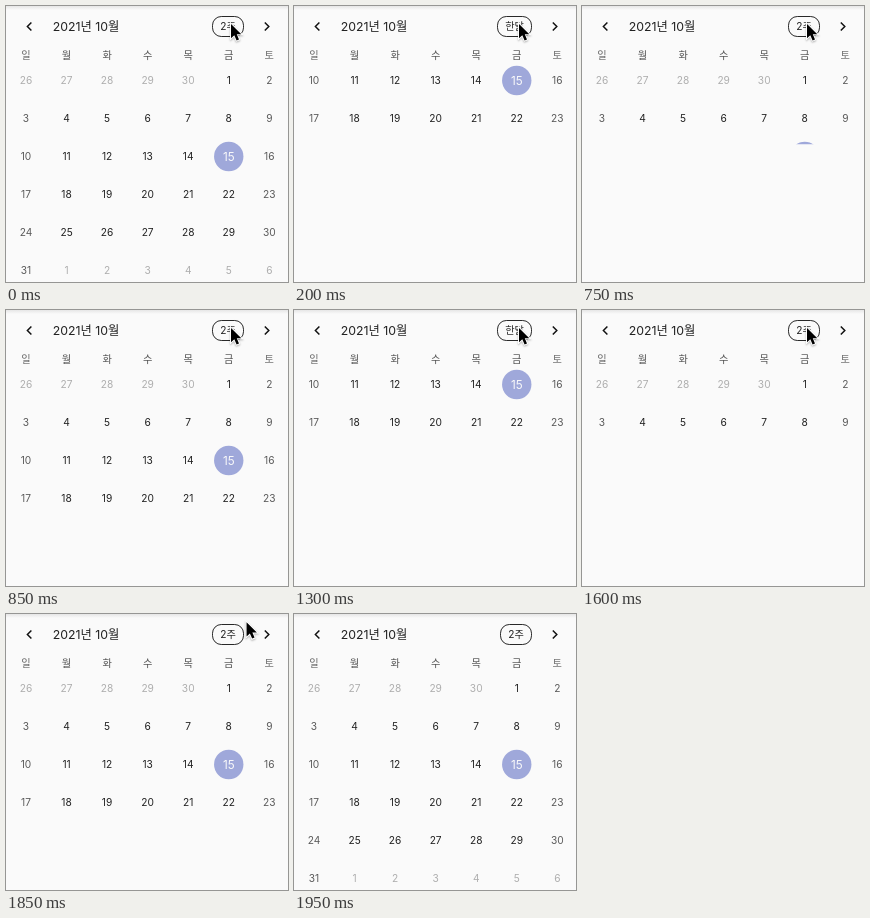
These frames come from a looping animation (282x276 px, 2570 ms). An HTML page with a canvas:

```html
<!DOCTYPE html>
<html lang="ko">
<head>
<meta charset="utf-8">
<title>Calendar</title>
<style>
  html, body { margin: 0; width: 100%; height: 100%; overflow: hidden; background: #fafafa; }
  canvas { display: block; width: 282px; height: 276px; }
</style>
</head>
<body>
<canvas id="stage"></canvas>
<script>
const W = 282, H = 276, LOOP = 2570, STEP = 50;
const ROW = 38, GRID_TOP = 55.5, TWO_WEEKS = 2 * ROW, SIX_WEEKS = 6 * ROW;
const FONT = 'Inter, "Noto Sans CJK KR", "Noto Sans CJK", sans-serif';
const canvas = document.getElementById('stage');
const ctx = canvas.getContext('2d');
const scale = window.devicePixelRatio || 1;
canvas.width = W * scale;
canvas.height = H * scale;

const columnX = c => 20 + 40.55 * c;

function text(str, x, y, size, color, align = 'center') {
  ctx.font = `${size}px ${FONT}`;
  ctx.textAlign = align;
  ctx.fillStyle = color;
  ctx.fillText(str, x, y);
}

function chevron(x, y, dir) {
  ctx.beginPath();
  ctx.moveTo(x - 2 * dir, y - 4);
  ctx.lineTo(x + 2 * dir, y);
  ctx.lineTo(x - 2 * dir, y + 4);
  ctx.lineWidth = 1.5;
  ctx.strokeStyle = '#111';
  ctx.stroke();
}

function formatButton(label, left) {
  const right = 237.5;
  ctx.beginPath();
  ctx.roundRect(left, 10.5, right - left, 20, 8.8);
  ctx.lineWidth = 0.9;
  ctx.strokeStyle = '#111';
  ctx.stroke();
  text(label, (left + right) / 2, 24, 10.2, '#222');
}

function header(monthly) {
  const shade = ctx.createLinearGradient(0, 0, 0, 4);
  shade.addColorStop(0, '#e6e6e6');
  shade.addColorStop(1, '#fafafa');
  ctx.fillStyle = shade;
  ctx.fillRect(0, 0, W, 4);
  chevron(23.4, 20.5, -1);
  chevron(260.8, 20.5, 1);
  text('2021년 10월', 46.7, 24.8, 12.3, '#222', 'left');
  if (monthly) formatButton('2주', 206.5);
  else formatButton('한달', 203.5);
  [...'일월화수목금토'].forEach((name, c) =>
    text(name, columnX(c), 53, 10.2, c % 6 ? '#4f4f4f' : '#6a6a6a'));
}

function dayCell(date, c, row) {
  const x = columnX(c), y = GRID_TOP + ROW * (row + 0.5);
  const outside = date < 1 || date > 31;
  const label = date < 1 ? date + 30 : date > 31 ? date - 31 : date;
  if (date === 15) {
    ctx.beginPath();
    ctx.arc(x, y, 14.7, 0, 2 * Math.PI);
    ctx.fillStyle = '#9fa8da';
    ctx.fill();
    text(label, x, y + 4.2, 11.7, '#fafafa');
  } else {
    text(label, x, y + 3.7, 10.2, outside ? '#aeaeae' : c % 6 ? '#222' : '#5a5a5a');
  }
}

function weeks(monthly, height) {
  ctx.save();
  ctx.beginPath();
  ctx.rect(0, GRID_TOP, W, height);
  ctx.clip();
  const firstDate = monthly ? -4 : 10;
  for (let i = 0; i < (monthly ? 42 : 14); i++)
    dayCell(firstDate + i, i % 7, Math.floor(i / 7));
  ctx.restore();
}

function cursor(x, y) {
  ctx.save();
  ctx.translate(x, y);
  ctx.shadowColor = 'rgba(0,0,0,.3)';
  ctx.shadowBlur = 2 * scale;
  ctx.shadowOffsetY = scale;
  const arrow = new Path2D('M0 0V14.2L3.3 11.2L5.6 16.4L8 15.4L5.8 10.3H10.3Z');
  ctx.lineWidth = 2;
  ctx.strokeStyle = '#fff';
  ctx.stroke(arrow);
  ctx.shadowColor = 'transparent';
  ctx.fillStyle = '#000';
  ctx.fill(arrow);
  ctx.restore();
}

function draw(now) {
  const time = now % LOOP;
  const t = Math.floor(time / STEP) * STEP;
  const monthly = t < 200 || (t >= 750 && t < 1300) || t >= 1600;
  const growStart = t < 200 ? -200 : t < 1300 ? 741 : 1750;
  const growth = Math.min(1, Math.max(0, (t - growStart) / 200));
  const height = monthly ? TWO_WEEKS + (SIX_WEEKS - TWO_WEEKS) * growth : TWO_WEEKS;

  ctx.setTransform(scale, 0, 0, scale, 0, 0);
  ctx.fillStyle = '#fafafa';
  ctx.fillRect(0, 0, W, H);
  header(monthly);
  weeks(monthly, height);

  // The pointer leaves towards the top right corner.
  const leave = Math.max(0, (t - 1750) / 150) ** 2;
  if (t < 1950) cursor(225 + 35 * leave, 18 - 22 * leave);
}

function frame(now) {
  draw(now);
  requestAnimationFrame(frame);
}
requestAnimationFrame(frame);
</script>
</body>
</html>
```
